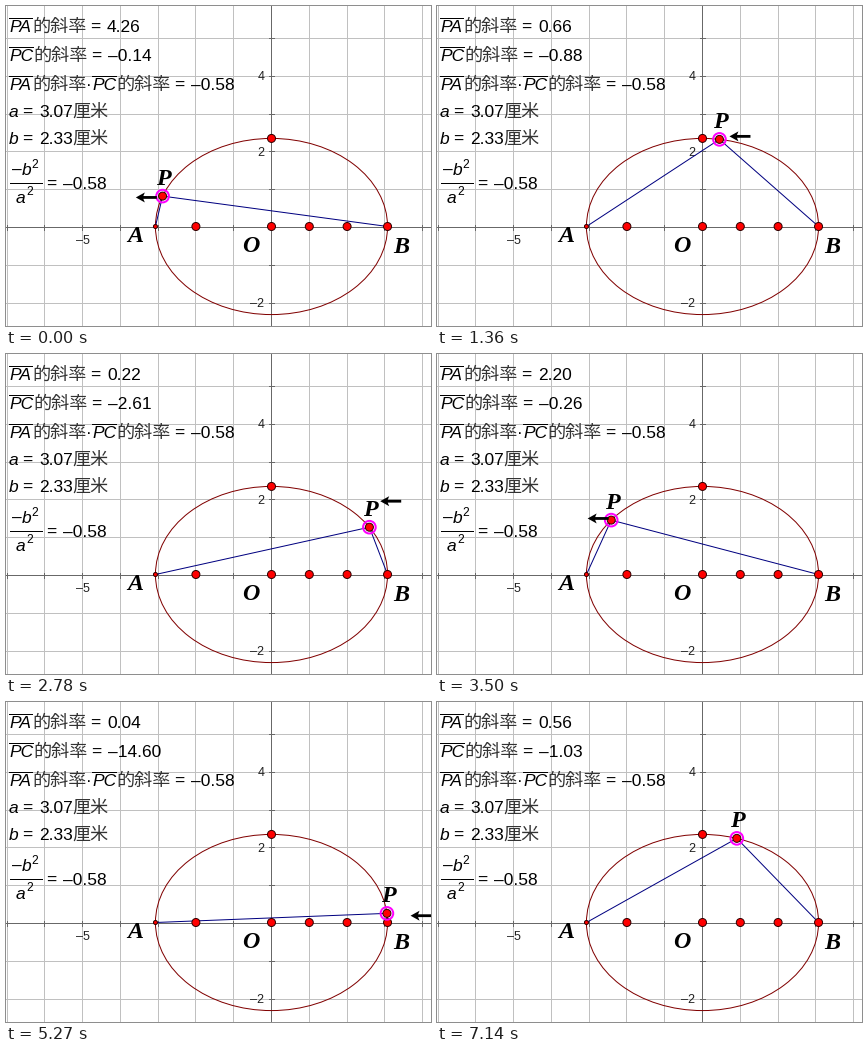
A matplotlib script that plays this animation: 425 by 320 pixels, repeating every 7.45 s.

```python
import numpy as np
import matplotlib.pyplot as plt
from matplotlib.animation import FuncAnimation
from matplotlib.patches import Circle, Ellipse, Polygon

W, H, DPI = 425, 320, 100
PT = 72 / DPI                      # points per pixel
LOOP, INTERVAL = 7450, 25
OX, OY, UNIT = 265.5, 220.5, 37.8
A_LEN, B_LEN = 3.07, 2.33
RX, RY = A_LEN * UNIT, B_LEN * UNIT
LATIN, CJK = "Liberation Sans", "Noto Sans CJK JP"
TEXT, HAN = 17.33, 18.1
UNDEFINED = "未定义"
AXIS = "#686868"

# Pose: angle of P on the ellipse, then the cursor tip relative to P.
# Angles just beyond 0 and 180 keep P resting on B and A.
AT_A, AT_B = (182, -50, 12), (-1, 25, 5)
RELEASE, LEAVE = (72.8, -7, -20), (72.8, 59, 193)
DRAG = {0: (159.1, -26, 1), 330: AT_A, 560: AT_A,
        1360: (81.6, 10, -3), 2060: AT_B, 2310: AT_B,
        2780: (32, 11, -26), 3500: (140.6, -23, -2), 3890: AT_A,
        4670: (106.1, -1, -26), 5390: AT_B, 5640: AT_B,
        6020: (45.5, -5, -17), 6420: RELEASE, 6620: RELEASE, 7140: LEAVE}
TIMES = np.array(list(DRAG))
POSES = np.array(list(DRAG.values()), float)


def tangents(times, values):
    """Slopes of a smooth curve that never overshoots its keys."""
    d = np.diff(values, axis=0) / np.diff(times)[:, None]
    product, total = d[:-1] * d[1:], d[:-1] + d[1:]
    same_way = product > 0
    inner = np.where(same_way, 2 * product / np.where(same_way, total, 1), 0)
    return np.vstack([d[0], inner, d[-1]])


SPEEDS = tangents(TIMES, POSES)


def pose(t):
    i = min(np.searchsorted(TIMES, t, side="right"), len(TIMES) - 1) - 1
    span = TIMES[i + 1] - TIMES[i]
    u = min((t - TIMES[i]) / span, 1)
    ease = u * u * (3 - 2 * u)
    bend = span * u * (1 - u) * ((1 - u) * SPEEDS[i] - u * SPEEDS[i + 1])
    return POSES[i] + (POSES[i + 1] - POSES[i]) * ease + bend


fig = plt.figure(figsize=(W / DPI, H / DPI), dpi=DPI, facecolor="white")
ax = fig.add_axes([0, 0, 1, 1])
ax.set_xlim(0, W)
ax.set_ylim(H, 0)
ax.axis("off")


def label(x, y, s, size=TEXT, font=LATIN, **kw):
    return ax.text(x, y, s, fontsize=size * PT, fontfamily=font,
                   va="baseline", **kw)


def line(xs, ys, color, z=1):
    return ax.plot(xs, ys, color=color, lw=PT, zorder=z)[0]


def dot(x, y, r=4):
    return ax.add_patch(Circle((x, y), r, fc="#ff0000", ec="#300000",
                               lw=PT, zorder=5))


def name(x, y, s):
    return label(x, y, s, 24, "Liberation Serif", ha="center",
                 weight="bold", style="italic", zorder=6)


def number(v):
    s = f"{v:.2f}"
    return "0.00" if s == "-0.00" else s.replace("-", "–")


# Grid, axes and ticks; y is rounded so that lines fall on whole pixel rows
for k in range(-8, 9):
    gx = np.floor(OX + k * UNIT) + 0.5
    gy = np.floor(OY + k * UNIT) + 1
    line([gx, gx], [0, H], AXIS if k == 0 else "#c0c0c0", 2 if k == 0 else 1)
    line([0, W], [gy, gy], AXIS if k == 0 else "#c0c0c0", 2 if k == 0 else 1)
    line([gx, gx], [OY - 2, OY + 3], AXIS, 2)
    line([OX - 2, OX + 3], [gy, gy], AXIS, 2)
for value in (4, 2, -2):
    label(258.5, OY - value * UNIT + 4.8, str(value).replace("-", "–"), 12.5,
          ha="right", color="#202020")
label(OX - 5 * UNIT, 238, "–5", 12.5, ha="center", color="#202020")

# Ellipse and fixed points
ax.add_patch(Ellipse((OX, OY), 2 * RX, 2 * RY, fc="none", ec="#800000",
                     lw=PT, zorder=3))
for k in (-2, 0, 1, 2):
    dot(OX + k * UNIT, OY)
dot(OX, OY - RY)
dot(OX + RX, OY)
dot(OX - RX, OY, 2)
name(129, 236.5, "A")
name(244.6, 246.5, "O")
name(395.4, 247.2, "B")

# Measurements
LEFT = 3


def han(x, y, s):
    label(x, y, s, HAN, CJK, color="#333333")
    return x + len(s) * HAN


def slope_of(x, y, s, width):
    """Segment name with an overline, then the words for its slope."""
    label(x, y, s, style="italic")
    line([x, x + width], [y - 14.5] * 2, "black", 6)
    return han(x + width, y, "的斜率")


def equals(x, y, s=""):
    label(x + 3.5, y, "=")
    return label(x + 20.5, y, s, font=[LATIN, CJK])


pa_text = equals(slope_of(LEFT, 26, "PA", 23.1), 26)
pc_text = equals(slope_of(LEFT, 55, "PC", 24), 55)
dot_x = slope_of(LEFT, 84, "PA", 23.1)
label(dot_x, 84, "·")
product_text = equals(slope_of(dot_x + 5.8, 84, "PC", 24), 84)
for s, length, y in (("a", A_LEN, 111), ("b", B_LEN, 138)):
    label(LEFT, y, s, style="italic")
    equals(LEFT + 9.6, y, number(length))
    han(LEFT + 63.8, y, "厘米")

label(6, 169, "–")
label(15.6, 169, "b", style="italic")
label(25.5, 162, "2", 12)
line([4, 36], [176.5, 176.5], "black", 6)
label(10, 197, "a", style="italic")
label(20, 189, "2", 12)
equals(36.5, 183, number(-(B_LEN / A_LEN) ** 2))

# Moving parts
chords = line([], [], "#000080", 4)
point = dot(0, 0)
ring = ax.add_patch(Circle((0, 0), 6.3, fc="none", ec="#ff00ff",
                           lw=2 * PT, zorder=5))
p_name = name(0, 0, "P")
ARROW = np.array([(0, 0), (9, -5), (7.5, -1.4), (21, -1.4),
                  (21, 1.4), (7.5, 1.4), (9, 5)])
cursor = ax.add_patch(Polygon(ARROW, fc="black", ec="none", zorder=8))


def update(frame):
    angle, dx, dy = pose(frame * INTERVAL + 10)
    angle = np.clip(angle, 0, 180)
    theta = np.radians(angle)
    x, y = OX + RX * np.cos(theta), OY - RY * np.sin(theta)

    chords.set_data([OX - RX, x, OX + RX], [OY, y, OY])
    point.center = ring.center = (x, y)
    p_name.set_position((x + 1, y - 11))
    cursor.set_xy(ARROW + (x + dx, y + dy))

    ratio, half = B_LEN / A_LEN, np.tan(theta / 2)
    at_a, at_b = angle >= 180, angle <= 0
    pa_text.set_text(UNDEFINED if at_a else number(ratio * half))
    pc_text.set_text(UNDEFINED if at_b else number(-ratio / half))
    product_text.set_text(UNDEFINED if at_a or at_b else number(-ratio ** 2))
    return chords, point, ring, p_name, cursor, pa_text, pc_text, product_text


anim = FuncAnimation(fig, update, frames=LOOP // INTERVAL, interval=INTERVAL,
                     repeat=True, repeat_delay=0)
plt.show()
```
